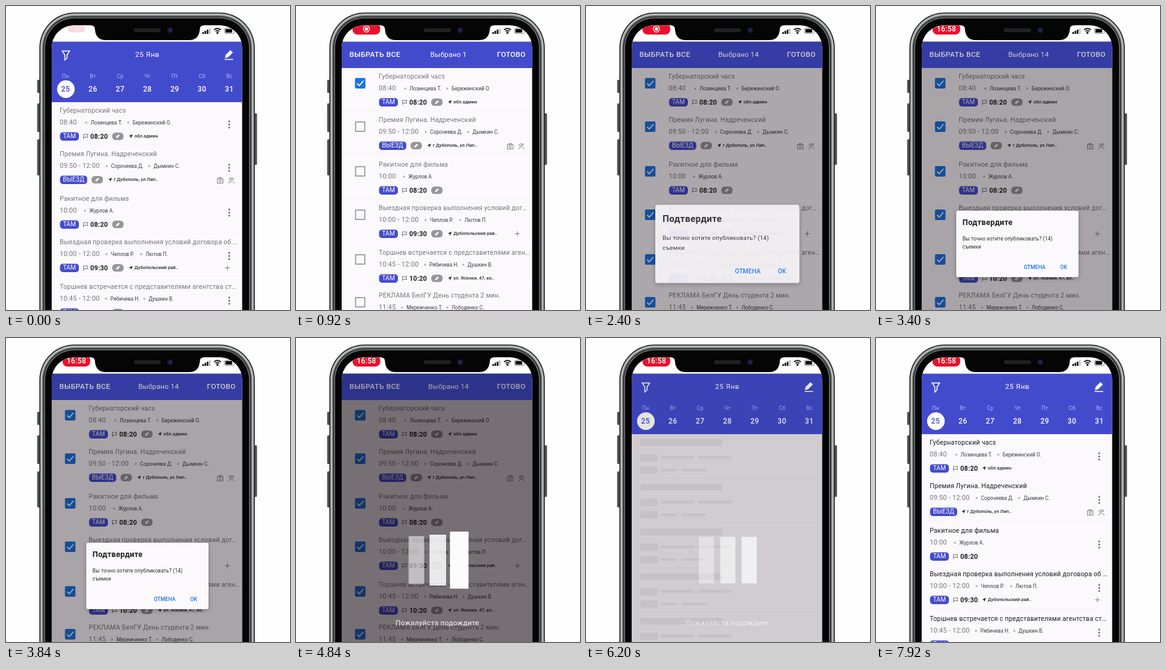
Recreate the animation shown at these times as an HTML page with a canvas. Size 460 by 490 pixels, loop 7.96 s.

```html
<!DOCTYPE html>
<html lang="ru">
<head>
<meta charset="utf-8">
<title>План съемок</title>
<style>
html, body { margin: 0; width: 100%; height: 100%; overflow: hidden; background: #fefefe; }
canvas { display: block; width: 460px; height: 490px; }
</style>
</head>
<body>
<canvas id="stage"></canvas>
<script>
const LOOP = 7960, W = 460, H = 490;
const BLUE = '#434bcd', PAPER = '#fcf9fd', LINK = '#1c75e4';
const canvas = document.getElementById('stage');
const c = canvas.getContext('2d');
const dpr = window.devicePixelRatio || 1;
canvas.width = W * dpr;
canvas.height = H * dpr;

// dots: x of the bullet before each name; cut: title used in selection mode
const rows = [
  { y: 168, title: 'Губернаторский часs', time: '08:40', people: ['Лозинцева Т.', 'Бережинский О.'], dots: [130, 198],
    tag: 'ТАМ', at: '08:20', place: 'обл.админ' },
  { y: 238, title: 'Премия Лугина. Надреченский', time: '09:50 - 12:00', people: ['Сорочеева Д.', 'Дымкин С.'], dots: [163, 232],
    tag: 'ВЫЕЗД', place: 'г Дубополь, ул Лип..', icons: 'crew' },
  { y: 310, title: 'Ракитное для фильма', time: '10:00', people: ['Журлов А.'], dots: [128], tag: 'ТАМ', at: '08:20' },
  { y: 380, title: 'Выездная проверка выполнения условий договора об …', cut: 'Выездная проверка выполнения условий дог…',
    time: '10:00 - 12:00', people: ['Чеплов Р.', 'Лютов П.'], dots: [163, 219],
    tag: 'ТАМ', at: '09:30', place: 'Дубопольский рай..', icons: 'plus' },
  { y: 452, title: 'Торшнев встречается с представителями агентства ст…', cut: 'Торшнев встречается с представителями аген…',
    time: '10:45 - 12:00', people: ['Рябичева Н.', 'Душкин В.'], dots: [162, 224],
    tag: 'ТАМ', at: '10:20', place: 'ул. Ясенки, 47, ко..' },
  { y: 521, title: 'РЕКЛАМА БелГУ День студента 2 мин.', time: '11:45', people: ['Мережченко Т.', 'Лободенко С.'], dots: [125, 198],
    tag: 'ТАМ', at: '11:20' }
];

const clamp = v => Math.max(0, Math.min(1, v));
const ramp = (t, a, b) => clamp((t - a) / (b - a));
const smooth = v => v * v * (3 - 2 * v);

function text(s, x, y, size, color, weight = 400, align = 'left', spacing = 0) {
  c.font = `${weight} ${size}px Roboto, "Noto Sans", sans-serif`;
  c.letterSpacing = spacing + 'px';
  c.textAlign = align;
  c.textBaseline = 'middle';
  c.fillStyle = color;
  c.fillText(s, x, y);
}
function box(x, y, w, h, r, color) {
  c.fillStyle = color;
  c.beginPath();
  c.roundRect(x, y, w, h, r);
  c.fill();
}
function disc(x, y, r, color) {
  c.fillStyle = color;
  c.beginPath();
  c.arc(x, y, r, 0, 7);
  c.fill();
}
function poly(points, color, width) {
  c.beginPath();
  for (let i = 0; i < points.length; i += 2) c.lineTo(points[i], points[i + 1]);
  if (width) {
    c.strokeStyle = color;
    c.lineWidth = width;
    c.stroke();
  } else {
    c.fillStyle = color;
    c.fill();
  }
}
function layer(alpha, draw) {
  if (alpha <= 0) return;
  c.save();
  c.globalAlpha *= alpha;
  draw();
  c.restore();
}
function at(x, y, draw, scale = 1) {
  c.save();
  c.translate(x, y);
  c.scale(scale, scale);
  draw();
  c.restore();
}

function pencil(x, y, scale, color) {
  at(x, y, () => poly([-5, 5, -4, 1, 2, -5, 5, -2, -1, 4], color), scale);
}

function phone() {
  for (const [y, h] of [[119, 21], [157, 46], [215, 58]]) box(50.5, y, 6, h, 1.5, '#4a4c4c');
  box(400, 173, 6.5, 83, 1.5, '#4a4c4c');
  const rim = (inset, color) => box(54 + inset, 10.5 + inset, 349 - 2 * inset, 600, 57 - inset, color);
  rim(0, '#2b2d2d');
  rim(1.8, '#b9bebd');
  rim(4.6, '#6f7373');
  rim(6.2, '#2a2c2c');
  rim(8, '#8a8e8e');
  rim(9.2, '#050506');
}

function notch() {
  c.fillStyle = '#050506';
  c.beginPath();
  c.moveTo(136, 31);
  c.quadraticCurveTo(144, 31, 144, 37);
  c.quadraticCurveTo(145, 55, 162, 55);
  c.lineTo(296, 55);
  c.quadraticCurveTo(313, 55, 314, 37);
  c.quadraticCurveTo(314, 31, 322, 31);
  c.fill();
  box(207, 36, 44, 6, 3, '#212123');
  disc(266, 39, 5, '#15152b');
  disc(266, 39, 2.4, '#292968');
}

function statusBar(t) {
  for (let i = 0; i < 4; i++) box(318 + i * 3.6, 42 - i * 2, 2.6, 3 + i * 2, 0.6, i < 3 ? '#111' : '#bbb');
  c.strokeStyle = '#111';
  c.lineWidth = 1.9;
  for (const r of [4.4, 7.8]) {
    c.beginPath();
    c.arc(342.5, 44, r, -2.36, -0.78);
    c.stroke();
  }
  disc(342.5, 43.2, 1.7, '#111');
  c.strokeStyle = '#777';
  c.lineWidth = 0.9;
  c.beginPath();
  c.roundRect(354, 35.5, 16, 9, 2.4);
  c.stroke();
  box(355.4, 36.9, 11, 6.2, 1.2, '#111');
  box(371, 38.5, 1.4, 3, 0.6, '#777');

  const show = smooth(ramp(t, -90, 280));
  const clock = smooth(ramp(t, 2950, 3150));
  layer(show, () => at(114, 37, () => {
    box(-22.5, -9, 45, 18, 8, '#e8112d');
    layer(1 - clock, () => {
      c.strokeStyle = '#fff';
      c.lineWidth = 1.2;
      c.beginPath();
      c.arc(0, 0, 5, 0, 7);
      c.stroke();
      disc(0, 0, 2.7, '#fff');
    });
    layer(clock, () => text('16:58', 0, 0.5, 12, '#fff', 500, 'center', 0.2));
  }, 0.55 + 0.45 * show));
}

function calendar() {
  poly([91, 72.5, 103, 72.5, 98.8, 79, 98.8, 84, 95.3, 87, 95.3, 79, 91, 72.5, 103, 72.5], '#fff', 1.5);
  text('25 Янв', 229, 78.8, 11.5, '#fff', 400, 'center', 0.5);
  pencil(361, 77.5, 1.3, '#fff');
  box(354, 85.5, 14, 1.6, 0.5, '#fff');
  ['Пн', 'Вт', 'Ср', 'Чт', 'Пт', 'Сб', 'Вс'].forEach((d, i) => {
    const x = 96.5 + i * 44.2;
    text(d, x, 113.5, 8.8, '#b3b7ef', 400, 'center');
    if (!i) disc(x + 0.5, 134, 14.3, '#fff');
    text(25 + i, x, 134.3, 11.9, i ? '#fff' : BLUE, 500, 'center', 0.4);
  });
}

function selectionBar(t) {
  const tap = ramp(t, 1480, 1640) * (1 - ramp(t, 1800, 2100));
  layer(tap, () => box(84, 65, 87, 27, 3, 'rgba(255,255,255,.15)'));
  text('ВЫБРАТЬ ВСЕ', 86.5, 79, 11.8, '#fff', 500, 'left', 0.4);
  text('Выбрано ' + (t < 1520 ? 1 : 14), 247, 79, 11.6, '#fff', 400, 'center', 0.1);
  text('ГОТОВО', 372, 79, 11.8, '#fff', 500, 'right', 0.3);
}

function checkbox(y, on) {
  if (!on) {
    c.strokeStyle = '#8a8a8e';
    c.lineWidth = 1.5;
    c.strokeRect(96.5, y - 7.5, 15, 15);
    return;
  }
  box(95.5, y - 8.5, 17, 17, 2, LINK);
  poly([99, y + 0.3, 102.5, y + 3.8, 109.3, y - 4], '#fff', 1.8);
}

function flag(x, y) {
  poly([x, y + 4.5, x, y - 3, x + 7, y - 3, x + 5.7, y - 0.8, x + 7, y + 1.6, x, y + 1.6], '#55535a', 0.8);
}

function crewIcons(y) {
  c.strokeStyle = '#777';
  c.lineWidth = 0.9;
  c.strokeRect(342.5, y - 2.5, 9, 7);
  c.strokeRect(345, y - 4.5, 4, 2);
  c.beginPath();
  c.arc(347, y + 1, 1.8, 0, 7);
  c.stroke();
  c.beginPath();
  c.arc(363.5, y - 2, 2, 0, 7);
  c.moveTo(360.5, y + 5);
  c.quadraticCurveTo(363, y - 1, 366, y + 3);
  c.moveTo(368, y - 3);
  c.arc(367, y - 2.5, 1.5, 0, 7);
  c.moveTo(367, y + 1);
  c.lineTo(370, y + 5);
  c.stroke();
}

function row(r, i, k, t, done) {
  const dx = 47 * k, y = r.y - 55 * k, x = 87 + dx;
  const line = y + 42, gray = '#77757a';
  box(76, y + 55.5, 304, 0.8, 0, '#f5f1f7');
  text(k > 0.5 && r.cut || r.title, x, y + 0.5, 10.5, done ? '#1d1c20' : gray, 400, 'left', 0.17);
  text(r.time, x, y + 20, 10.8, gray, 400, 'left', 0.2);
  r.people.forEach((name, n) => {
    disc(r.dots[n] + dx, y + 20, 1.7, '#b5b2b8');
    text(name, r.dots[n] + 7 + dx, y + 20.3, 8.3, '#3b393f');
  });

  const w = r.tag.length > 3 ? 44 : 30.5;
  box(x + 0.5, line - 6.5, w, 13.4, 4.5, BLUE);
  text(r.tag, x + 0.5 + w / 2, line + 0.5, 10, '#fff', 400, 'center', 0.1);
  let pos = x + w + 7.5;
  if (r.at) {
    flag(pos + 0.5, line);
    text(r.at, x + 49.5, line + 0.5, 10.8, '#1f1e22', 700, 'left', 0.15);
    pos = x + 85;
  }
  if (!done) {
    box(pos, line - 6, 18.5, 12, 5.5, '#98969a');
    pencil(pos + 9.2, line, 0.62, '#fff');
    pos += 27;
  }
  if (r.place) {
    poly([pos, line - 0.6, pos + 6.2, line - 3.2, pos + 3.5, line + 3.2, pos + 2.8, line + 0.2], '#222');
    text(r.place, pos + 9, line + 0.2, 7.6, '#2c2b30', 500);
  }

  layer(1 - k, () => {
    for (let n = -1; n < 2; n++) disc(361.5, y + 23 + n * 5, 1.4, '#666');
  });
  if (r.icons === 'crew') crewIcons(line + 1);
  if (r.icons === 'plus') {
    box(354.5, line - 0.4, 8, 0.9, 0, '#777');
    box(358, line - 4, 0.9, 8, 0, '#777');
  }
  layer(k, () => checkbox(y + 11.5, i === 0 || t > 1520));
}

function skeleton() {
  for (let i = 0; i < 5; i++) {
    const y = 169 + 72 * i;
    for (const [x, dy, w, h] of [[88, -6, 133, 11], [88, 18, 28, 12], [121, 21, 54, 5], [181, 21, 55, 5],
      [88, 38, 28, 12], [121, 42, 26, 4], [155, 42, 40, 4]]) box(x, y + dy, w, h, 2, '#efebf0');
    box(76, y + 57, 304, 0.8, 0, '#f3eff5');
  }
}

function dim(alpha, headEnd) {
  box(74, 57, 308.5, headEnd - 57, 0, `rgba(0,0,0,${alpha * 0.6})`);
  box(74, headEnd, 308.5, H - headEnd, 0, `rgba(10,0,4,${alpha})`);
}

function dialog(alpha, scale) {
  layer(alpha, () => at(229, 383.5, () => {
    c.save();
    c.shadowColor = 'rgba(0,0,0,.28)';
    c.shadowBlur = 7 * dpr;
    c.shadowOffsetY = 2 * dpr;
    box(-99, -53.5, 198, 107, 3, '#fbf9fc');
    c.restore();
    text('Подтвердите', -89, -34, 12.6, '#222', 700, 'left', 0.25);
    text('Вы точно хотите опубликовать? (14)', -89, -8, 8.4, '#2b2b2e', 400, 'left', 0.1);
    text('съемки', -89, 5.5, 8.4, '#2b2b2e', 400, 'left', 0.1);
    text('ОТМЕНА', 28, 38, 8.6, LINK, 500, 'center');
    text('OK', 75, 38, 8.6, LINK, 500, 'center');
  }, scale));
}

function loader(t, alpha) {
  [0.55, 0.85, 0.98].forEach((shade, i) => {
    const p = ((t - 4740 + (2 - i) * 100 + 5000) % 1000) / 500;
    const s = 1 + 0.45 * Math.pow(1 - clamp(p), 3);
    const w = 24.5 * s, h = 75 * s;
    layer(alpha * shade, () => box(195 + i * 34.7 - w / 2, 358 - h / 2, w, h, 0, '#fff'));
  });
  layer(alpha * 0.95, () => text('Пожалуйста подождите', 229, 460, 11.4, '#fff', 400, 'center', 0.4));
}

function render(t) {
  c.setTransform(dpr, 0, 0, dpr, 0, 0);
  c.fillStyle = '#fefefe';
  c.fillRect(0, 0, W, H);
  phone();

  c.save();
  c.beginPath();
  c.roundRect(74, 31.3, 308.5, 600, 36);
  c.clip();
  box(74, 29, 309, 470, 0, PAPER);

  const back = t >= 5900;
  const k = back ? 0 : smooth(ramp(t, 560, 860));
  const loaded = back ? smooth(ramp(t, 6850, 7000)) : 1;
  const headEnd = 155 - 55 * k;
  layer(1 - loaded, skeleton);
  layer(loaded, () => rows.forEach((r, i) => row(r, i, k, t, back)));

  box(74, 29, 309, 28.5, 0, '#fff');
  box(74, 57.5, 309, headEnd - 57.5, 0, BLUE);
  c.save();
  c.beginPath();
  c.rect(74, 57, 309, headEnd - 57);
  c.clip();
  layer(clamp(1 - k * 2), calendar);
  layer(clamp(k * 2 - 1), () => selectionBar(t));
  c.restore();

  const enter = ramp(t, 2280, 2580), leave = ramp(t, 4000, 4200);
  const wait = ramp(t, 4200, 4450), gone = ramp(t, 6000, 6300);
  const shade = 0.34 * clamp(enter * 2.4) + 0.21 * wait;
  dim(shade * (1 - gone), headEnd);
  dialog(clamp(enter * 2.25) * (1 - leave), 1.3 - 0.3 * enter);
  loader(t, wait * Math.pow(1 - gone, 0.3));

  statusBar(t);
  c.restore();
  notch();
}

function frame(now) {
  render(now % LOOP);
  requestAnimationFrame(frame);
}
requestAnimationFrame(frame);
</script>
</body>
</html>
```
